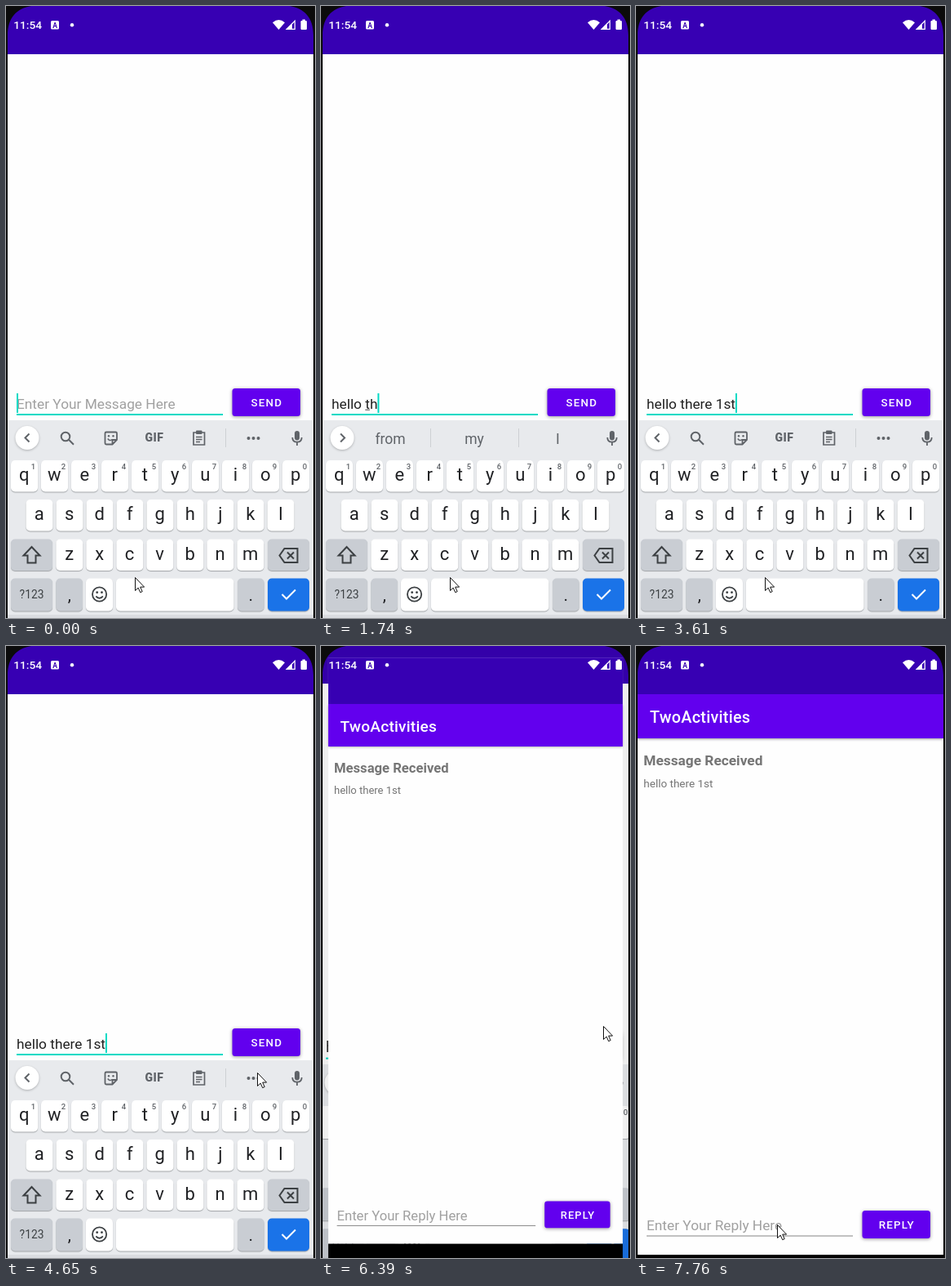
An HTML page with a canvas for the animation above (8 s loop, 379 px wide and 749 px high).

```html
<!DOCTYPE html>
<html lang="en">
<head>
<meta charset="utf-8">
<title>Message sending demo</title>
<style>
  html, body { margin: 0; width: 100%; height: 100%; overflow: hidden; background: #0b0b0b; }
  canvas { display: block; width: 379px; height: 749px; }
</style>
</head>
<body>
<canvas id="stage"></canvas>
<script>
const W = 379, H = 749, LOOP = 8000;
const PURPLE = '#6200ee', DARK = '#3700b3', TEAL = '#03dac5', PAPER = '#fefefe';
const INK = '#202124', ICON = '#5f6368', HINT = '#a0a0a0', BODY = '#757575';
const canvas = document.getElementById('stage');
const ctx = canvas.getContext('2d');
const dpr = window.devicePixelRatio || 1;
canvas.width = W * dpr;
canvas.height = H * dpr;

// Each timeline holds its value until the next entry: [time, ...value]
const typing = [ // text, composing underline from/to, caret visible
  [0, '', 0, 0, true], [560, '', 0, 0, false], [810, 'h', 0, 1, true],
  [1080, 'he', 0, 2, true], [1200, 'hel', 0, 3, true], [1350, 'hell', 0, 4, true],
  [1500, 'hello', 0, 5, true], [1620, 'hello t', 6, 7, true], [1740, 'hello th', 6, 7, true],
  [1890, 'hello the', 6, 9, true], [2160, 'hello there', 6, 11, true],
  [2460, 'hello there ', 6, 11, true], [2970, 'hello there ', 0, 0, true],
  [3120, 'hello there 1', 0, 0, true], [3490, 'hello there 1s', 0, 0, true],
  [3610, 'hello there 1st', 0, 0, true], [4230, 'hello there 1st', 0, 0, false],
  [4650, 'hello there 1st', 0, 0, true], [5170, 'hello there 1st', 0, 0, false]
];
const suggestions = [
  [0], [1080, 'he', 'her', 'hey'], [1350, 'hello', 'help', 'hell'], [1620, 'from', 'my', 'I'],
  [2010, 'the', 'that', 'this'], [2310, 'the', 'there', "there's"],
  [2580, 'there', "there's", 'therefore'], [3120, 'is', 'are', 'any'], [3490]
];
const pointer = [
  [0, 158, 699], [4230, 170, 689], [4380, 238, 612], [4500, 298, 542], [4650, 308, 522],
  [4770, 331, 489], [4890, 346, 465], [7190, 304, 524], [7340, 244, 612],
  [7460, 188, 688], [7610, 175, 705], [7760, 173, 708]
];
const opening = [ // scale of the leaving and the entering screen
  [0, 1, 0], [6390, 1.04, .963], [6540, 1.05, .992], [6660, 0, 1]
];

const at = (timeline, t) => timeline.findLast(step => step[0] <= t).slice(1);

function rect(x, y, w, h, color) {
  ctx.fillStyle = color;
  ctx.fillRect(x, y, w, h);
}

function rounded(x, y, w, h, r, color, shadow) {
  ctx.save();
  if (shadow) {
    ctx.shadowColor = shadow.color;
    ctx.shadowBlur = shadow.blur * dpr;
    ctx.shadowOffsetY = shadow.y * dpr;
  }
  ctx.fillStyle = color;
  ctx.beginPath();
  ctx.roundRect(x, y, w, h, r);
  ctx.fill();
  ctx.restore();
}

function text(str, x, y, size, color, { weight = 400, align = 'left', spacing = 0 } = {}) {
  ctx.font = `${weight} ${size}px Roboto, sans-serif`;
  ctx.textAlign = align;
  ctx.letterSpacing = spacing + 'px';
  ctx.fillStyle = color;
  ctx.fillText(str, x, y);
}

function fill(d, color) {
  ctx.fillStyle = color;
  ctx.fill(new Path2D(d));
}

function stroke(d, color, width = 2) {
  ctx.strokeStyle = color;
  ctx.lineWidth = width;
  ctx.stroke(new Path2D(d));
}

function dot(x, y, r, color) {
  ctx.fillStyle = color;
  ctx.beginPath();
  ctx.arc(x, y, r, 0, 2 * Math.PI);
  ctx.fill();
}

function button(label, x, y, labelX, color = PURPLE, lift = 1) {
  rounded(x, y, 83.5, 34, 3.5, color, { color: 'rgba(0,0,0,.4)', blur: 2 + 2 * lift, y: lift });
  text(label, labelX, y + 22.3, 13.4, '#fff', { weight: 500, spacing: 1.2 });
}

function key(x, y, w, color = '#fff', h = 38.5) {
  rounded(x, y, w, h, 5, color, { color: 'rgba(60,64,67,.4)', blur: 1, y: 1 });
}

function toolbar(words) {
  const open = words.length > 0;
  rounded(11.5, 514, 29, 29, 14.5, '#fff', { color: 'rgba(0,0,0,.25)', blur: 3, y: 1 });
  stroke(open ? 'M24 523.5L29 528.5L24 533.5' : 'M28.5 523.5L23.5 528.5L28.5 533.5', ICON);

  if (open) {
    words.forEach((word, i) => text(word, [85, 188, 290.5][i], 535.7, 17.5, ICON, { align: 'center' }));
    rect(134, 517, 1, 23, '#cdd0d4');
    rect(242, 517, 1, 23, '#cdd0d4');
  } else {
    stroke('M78.3 527a5.3 5.3 0 1 1-10.6 0a5.3 5.3 0 1 1 10.6 0M77 530.8L83 536.8', ICON);
    stroke('M123 521.5H134.5Q136 521.5 136 523V531L130.5 536.5H123Q121.5 536.5 121.5 535V523Q121.5 521.5 123 521.5ZM136 531H130.5V536.5', ICON, 1.8);
    stroke('M124.8 529.5Q127 533 130 530.5', ICON, 1.5);
    dot(126, 526.2, 1.2, ICON);
    dot(131.5, 526.2, 1.2, ICON);
    text('GIF', 182, 533.3, 14, ICON, { weight: 900, align: 'center', spacing: .6 });
    stroke('M230 522H243.5V537H230ZM233 527.5H240.5M233 530.5H240.5M233 533.5H238', ICON, 1.7);
    rounded(233, 519.5, 7.5, 4.5, 1, ICON);
    rect(269, 517, 1, 23, '#cdd0d4');
    [297.5, 303.5, 309.5].forEach(x => dot(x, 529, 2, ICON));
  }

  rounded(354, 520, 6, 11.5, 3, ICON);
  stroke('M351.3 528Q351.3 533.7 357 533.7Q362.7 533.7 362.7 528M357 533.7V538', ICON, 1.8);
}

function keyboard(words) {
  rect(0, 507, W, 260, '#e8eaed');
  toolbar(words);

  [['qwertyuiop', 6, 556], ['asdfghjkl', 24.5, 604], ['zxcvbnm', 61.3, 652.5]].forEach(([letters, left, y], row) => {
    [...letters].forEach((letter, i) => {
      const x = left + i * 37;
      key(x, y, 33);
      text(letter, x + 16.3, y + 25.3, 22, INK, { align: 'center' });
      if (row === 0) text((i + 1) % 10, x + 27.5, y + 10.5, 9.5, ICON, { weight: 500, align: 'center' });
    });
  });

  const grey = '#c9cdd3', mark = '#3c4043';
  key(6, 652.5, 51, grey);
  stroke('M31.5 662L41.5 672.5H36.5V681.5H26.5V672.5H21.5Z', mark);
  key(321, 652.5, 51, grey);
  stroke('M341.5 664H357.5V681H341.5L335.5 672.5ZM345 668.5L353 676.5M353 668.5L345 676.5', mark);

  key(6, 700.5, 51, grey, 40);
  text('?123', 31.5, 725.3, 13.8, mark, { align: 'center' });
  key(61.5, 700.5, 32.5, grey, 40);
  text(',', 77.8, 728, 21, INK, { align: 'center' });
  key(98, 700.5, 33, '#fff', 40);
  stroke('M123.2 720a8.6 8.6 0 1 1-17.2 0a8.6 8.6 0 1 1 17.2 0M110.3 722.3Q114.6 727.2 118.9 722.3', mark, 1.8);
  dot(111.7, 717.7, 1.4, mark);
  dot(117.5, 717.7, 1.4, mark);
  key(135, 700.5, 144.5, '#fff', 40);
  key(284, 700.5, 32.5, grey, 40);
  text('.', 300.2, 728, 21, INK, { align: 'center' });
  key(321, 700.5, 51, '#1a73e8', 40);
  stroke('M338.5 720L344 725.5L355 714.5', '#fff');
  rect(0, 745, W, 22, '#dadce0');
}

function sendScreen(t) {
  const [message, from, to, caret] = at(typing, t);
  const pressed = t >= 5440;
  const left = 13, size = 17.3;
  rect(0, 0, W, H, PAPER);
  rect(0, 0, W, 59, DARK);
  rect(left, 499, 253, 2, TEAL);

  if (message) text(message, left, 492.7, size, '#212121');
  else text('Enter Your Message Here', left, 492.7, size, HINT);
  const widthOf = n => ctx.measureText(message.slice(0, n)).width;
  if (to) rect(left + widthOf(from), 493.7, widthOf(to) - widthOf(from), 1, '#444');
  if (caret) rect(left + (message ? widthOf(message.length) : 0), 474, 2, 24, TEAL);

  button('SEND', 277.5, 468, 300.5, pressed && t < 5560 ? '#7a2bf0' : PURPLE, pressed ? 2 : 1);
  keyboard(at(suggestions, t));
}

function replyScreen() {
  rect(2, 0, 375, 745, PAPER);
  rect(2, 745, 375, 30, '#000');
  rounded(2, 59, 375, 54, 0, PURPLE, { color: 'rgba(0,0,0,.4)', blur: 3, y: 1 });
  rect(2, 0, 375, 59, DARK);
  text('TwoActivities', 17, 93.8, 19.8, '#fff', { weight: 500, spacing: .25 });
  text('Message Received', 9.3, 146.2, 17.3, BODY, { weight: 700 });
  text('hello there 1st', 9.3, 173.3, 13.5, BODY);
  text('Enter Your Reply Here', 13, 715.3, 17.3, HINT);
  rect(13, 721.5, 253, 1, '#868686');
  button('REPLY', 277.5, 691, 297.7);
}

function statusIcons() {
  text('11:54', 9.3, 28.3, 13.7, '#fff', { weight: 500 });
  rounded(55, 18, 10, 10.5, 1.5, '#fff');
  text('A', 60, 26.5, 8.5, DARK, { weight: 700, align: 'center' });
  dot(81, 23.3, 2.2, '#fff');
  fill('M334.5 29L327 20.3Q334.5 13.7 342 20.3Z', '#fff');
  fill('M351 21V29H343Z', '#fff');
  stroke('M354.3 18.3V28.4H344.3Z', '#fff', 1.2);
  rounded(361.5, 18, 7.5, 11, 1.2, '#fff');
  rect(363.5, 16.5, 3.5, 2, '#fff');
}

function bezel() {
  fill('M0 0H379V749H377V36C377 14 366 3 348 0H31C13 3 2 14 2 36V749H0Z', '#0b0b0b');
}

function cursor(x, y) {
  const arrow = `M${x + .5} ${y + .5}v16l3.7 -3.4l2.5 5.6l2.5 -1.1l-2.5 -5.5h4.9z`;
  fill(arrow, '#fff');
  stroke(arrow, '#111', 1);
}

function zoomed(scale, draw) {
  ctx.save();
  ctx.translate(189.5, 383);
  ctx.scale(scale, scale);
  ctx.translate(-189.5, -383);
  draw();
  ctx.restore();
}

function frame(now) {
  const t = now % LOOP;
  const [leaving, entering] = at(opening, t);
  ctx.setTransform(dpr, 0, 0, dpr, 0, 0);
  if (leaving) zoomed(leaving, () => sendScreen(t));
  if (leaving && entering) rect(0, 0, W, H, 'rgba(0,0,0,.06)');
  if (entering) zoomed(entering, replyScreen);
  statusIcons();
  bezel();
  cursor(...at(pointer, t));
}

const start = performance.now();
function tick() {
  frame(performance.now() - start);
  requestAnimationFrame(tick);
}
tick();
</script>
</body>
</html>
```
